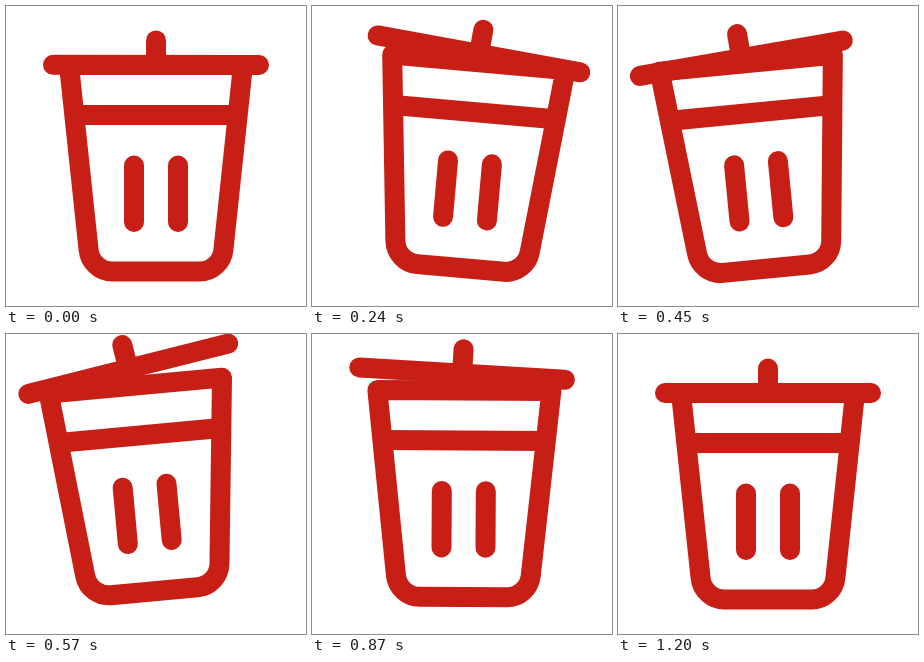
Write an HTML page that moves like this. It is 300x300 px and loops after 1730 ms.

```html
<!DOCTYPE html>
<html lang="en">
<head>
<meta charset="utf-8">
<title>Trash bin</title>
<style>
  html, body { margin: 0; width: 100%; height: 100%; overflow: hidden; background: #fff; }
  svg { display: block; width: 100vw; height: 100vh; }
  g { fill: none; stroke: #c71f16; stroke-width: 20; stroke-linecap: round; stroke-linejoin: round; }

  .hop, .bin, .lift, .lid {
    animation-duration: 1730ms;
    animation-iteration-count: infinite;
    animation-timing-function: cubic-bezier(.37, 0, .63, 1);
  }
  .hop { animation-name: hop; }
  .lift { animation-name: lift; }
  .bin { transform-origin: 150px 266px; animation-name: bin-tilt, bin-slide; }
  .lid { transform-origin: 150px 59px; animation-name: lid-tilt, lid-slide; }

  /* the whole bin leaves the ground three times: sine out going up, sine in coming down */
  @keyframes hop {
    0% { translate: 0 0; animation-timing-function: cubic-bezier(.39, .575, .565, 1); }
    11.56% { translate: 0 -3.7px; animation-timing-function: cubic-bezier(.47, 0, .745, .715); }
    23.12% { translate: 0 0; animation-timing-function: cubic-bezier(.39, .575, .565, 1); }
    38.15% { translate: 0 -9.3px; animation-timing-function: cubic-bezier(.47, 0, .745, .715); }
    53.18% { translate: 0 0; animation-timing-function: cubic-bezier(.39, .575, .565, 1); }
    61.27% { translate: 0 -4px; animation-timing-function: cubic-bezier(.47, 0, .745, .715); }
    69.36%, 100% { translate: 0 0; }
  }
  @keyframes bin-tilt {
    0% { rotate: 0deg; }
    11.56% { rotate: 5.6deg; }
    28.9% { rotate: -6.3deg; }
    46.24% { rotate: 1.6deg; }
    57.8% { rotate: -3deg; }
    69.36%, 100% { rotate: 0deg; }
  }
  @keyframes bin-slide {
    0% { translate: 0 0; }
    11.56% { translate: -1.5px 0; }
    20.81% { translate: -1px 0; }
    28.9% { translate: -2px 0; }
    43.35% { translate: 0 0; }
    57.23% { translate: 2.4px 0; }
    69.36%, 100% { translate: 0 0; }
  }

  /* lid motion, relative to the bin */
  @keyframes lift {
    0% { translate: 0 0; animation-timing-function: cubic-bezier(.39, .575, .565, 1); }
    11.56% { translate: 0 -8.8px; animation-timing-function: cubic-bezier(.47, 0, .745, .715); }
    23.12% { translate: 0 0; animation-timing-function: cubic-bezier(.39, .575, .565, 1); }
    42.77% { translate: 0 -23.6px; animation-timing-function: cubic-bezier(.47, 0, .745, .715); }
    57.8% { translate: 0 -1.2px; }
    62.43% { translate: 0 -1.3px; }
    69.36%, 100% { translate: 0 0; }
  }
  @keyframes lid-tilt {
    0% { rotate: 0deg; animation-timing-function: cubic-bezier(.39, .575, .565, 1); }
    11.56% { rotate: 5.5deg; animation-timing-function: cubic-bezier(.47, 0, .745, .715); }
    23.12% { rotate: 0deg; animation-timing-function: cubic-bezier(.39, .575, .565, 1); }
    32.37% { rotate: -8.9deg; }
    47.4% { rotate: 3.5deg; }
    57.8% { rotate: 1.2deg; }
    69.36%, 100% { rotate: 0deg; }
  }
  @keyframes lid-slide {
    0% { translate: 0 0; }
    11.56% { translate: -.7px 0; }
    20.81% { translate: -.3px 0; }
    28.9% { translate: -6px 0; }
    32.95% { translate: -5.5px 0; }
    43.35% { translate: -5.8px 0; }
    57.23% { translate: 1px 0; }
    69.36%, 100% { translate: 0 0; }
  }
</style>
</head>
<body>
<svg viewBox="0 0 300 300">
  <g class="hop">
    <g class="bin">
      <path d="M63 59H237L217.4 244A24 24 0 0 1 193.5 265.5H106.5A24 24 0 0 1 82.6 244Z"/>
      <path d="M69 109H231M128 159.5V216M172 159.5V216"/>
      <g class="lift">
        <path class="lid" d="M47 59H253M150 59V34.5"/>
      </g>
    </g>
  </g>
</svg>
</body>
</html>
```
